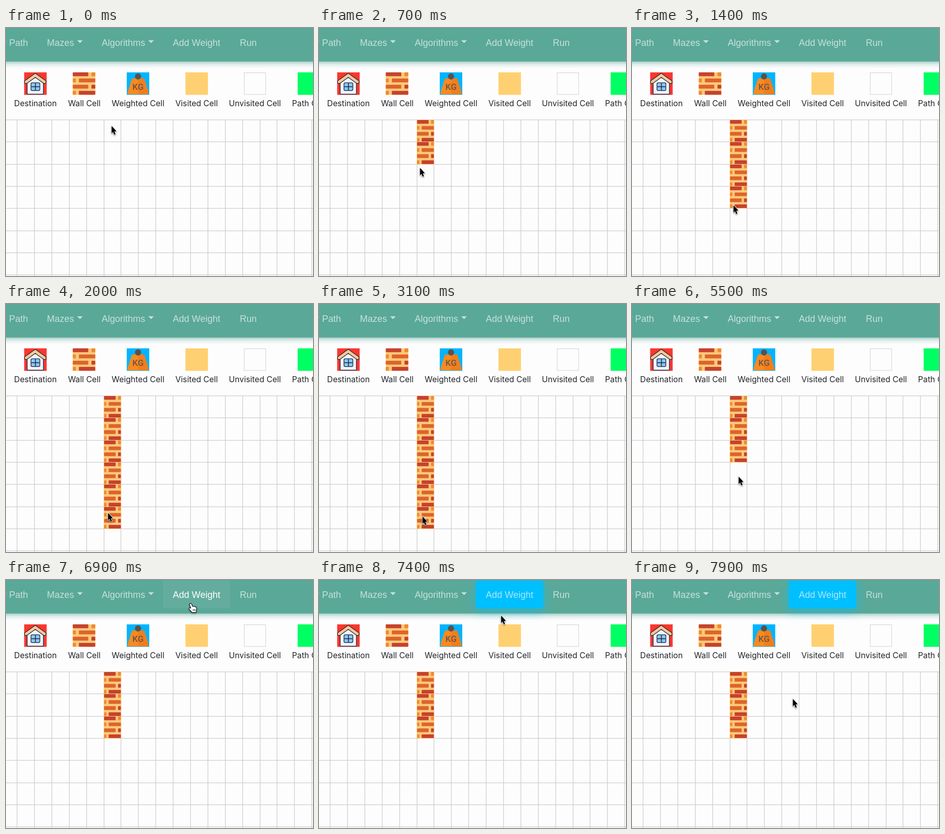
Write an HTML page with a canvas that moves like this. It is 600x485 px and loops after 8 s.

```html
<!DOCTYPE html>
<html lang="en">
<head>
<meta charset="utf-8">
<title>Grid walls</title>
<style>
html, body { margin: 0; width: 100%; height: 100%; overflow: hidden; background: #fefdfe; }
canvas { display: block; }
</style>
</head>
<body>
<canvas id="stage" width="600" height="485"></canvas>
<script>
const ctx = document.getElementById('stage').getContext('2d');
const LOOP = 8000, STEP = 100;
const NAV = '18px "Liberation Sans", Arial, sans-serif';
const LABEL = '15.7px Inter, sans-serif';
const TEAL = '#5aa898', DIM = 'rgba(255,255,255,.66)';
const WALL_COL = 5, ICON = 44, ICON_Y = 86.7;

const colX = i => Math.round(21.2 + 33.88 * i);
const rowY = i => Math.round(178.9 + 43.35 * i);

// [time, tip x, tip y]
const path = [
  [0, 206, 191], [200, 206, 192], [300, 204, 200], [700, 197, 273],
  [900, 197, 293], [1300, 198, 334], [1800, 198, 394], [2000, 199, 408],
  [2600, 200, 413], [3400, 203, 416], [4100, 204, 416], [4400, 205, 404],
  [4600, 206, 390], [5000, 207, 360], [5300, 208, 341], [5500, 208, 337],
  [6000, 212, 328], [6300, 232, 292], [6500, 285, 196], [6700, 345, 72],
  [6900, 361, 46], [7300, 361, 46], [7500, 350, 92], [7700, 328, 190],
  [7900, 314, 232]
];
const built = [300, 500, 800, 1200, 1500, 1900];
const erased = [3800, 4700, 5200];
const HOVER = [6700, 7400], CLICK = 7300;

function rect(color, x, y, w, h) {
  ctx.fillStyle = color;
  ctx.fillRect(x, y, w, h);
}

function text(str, x, y, font, color, align = 'left') {
  ctx.font = font;
  ctx.fillStyle = color;
  ctx.textAlign = align;
  ctx.fillText(str, x, y);
}

function shape(d, fill, stroke, width = 1.5) {
  const p = new Path2D(d);
  if (stroke) {
    ctx.strokeStyle = stroke;
    ctx.lineWidth = width;
    ctx.stroke(p);
  }
  if (fill) {
    ctx.fillStyle = fill;
    ctx.fill(p);
  }
}

function at(x, y, draw) {
  ctx.save();
  ctx.translate(x, y);
  draw();
  ctx.restore();
}

function brick(color, x, y, w, h) {
  ctx.fillStyle = color;
  ctx.beginPath();
  ctx.roundRect(x, y, w, h, 1.2);
  ctx.fill();
}

function bricks(x, y, w, h) {
  const red = '#c7422e', rust = '#de642b', amber = '#ef8b2c';
  rect('#fbc97b', x, y, w, h);
  [[red, amber], [amber, rust], [rust, red], [amber, red]].forEach(([a, b], i) => {
    const odd = i % 2, top = y + h * i * .275, tall = h * .17;
    brick(a, x, top, w * (odd ? .14 : .69), tall);
    const from = odd ? .27 : .83;
    brick(b, x + w * from, top, w * (1 - from), tall);
  });
}

function house() {
  const ink = '#17263f';
  rect('#fa372f', 0, 0, ICON, ICON);
  ctx.lineJoin = 'round';
  shape('M6.5 17L21.7 6L37 17V42H6.5Z', '#f0f3fa', ink, 2.6);
  shape('M1.5 17L21.7 2.5L42 17V21H38.5L21.7 9L5 21H1.5Z', '#fcc896', ink, 2.4);
  shape('M16 21H28Q30 21 30 23V33Q30 35 28 35H16Q14 35 14 33V23Q14 21 16 21Z', '#8cc7f4', ink, 2.6);
  shape('M22 21V35M14 28H30', null, ink, 1.5);
}

function weight() {
  rect('#00b4ff', 0, 0, ICON, ICON);
  shape('M10 12H34L43 41Q43 43 41 43H3Q1 43 1 41Z', '#f98a20');
  shape('M22 12H34L43 41Q43 43 41 43H22Z', '#f07e1c');
  ctx.beginPath();
  ctx.arc(22, 8, 6, 0, 7);
  ctx.fillStyle = '#5d5049';
  ctx.fill();
  text('KG', 22, 34, '500 17px Roboto, sans-serif', '#6b564a', 'center');
}

function legend() {
  at(35.5, ICON_Y, house);
  bricks(130.5, ICON_Y, ICON, ICON);
  at(236, ICON_Y, weight);
  rect('#ffd071', 350.7, ICON_Y, ICON, ICON);
  ctx.strokeStyle = '#d2d1d4';
  ctx.lineWidth = 1;
  ctx.strokeRect(465.5, 87.5, 42, 42.5);
  rect('#00ff62', 570, ICON_Y, ICON, ICON);
  const labels = [['Destination', 57.5], ['Wall Cell', 153], ['Weighted Cell', 258],
    ['Visited Cell', 372.5], ['Unvisited Cell', 486.5], ['Path Cell', 592]];
  for (const [name, x] of labels) text(name, x, 152.5, LABEL, '#212529', 'center');
}

function header(t) {
  const fade = ctx.createLinearGradient(0, 65, 0, 79);
  fade.addColorStop(0, 'rgba(90,168,152,.55)');
  fade.addColorStop(.45, 'rgba(90,168,152,.18)');
  fade.addColorStop(1, 'rgba(90,168,152,0)');
  rect(fade, 0, 65, 600, 14);
  rect(TEAL, 0, 0, 600, 65.5);

  const hover = t >= HOVER[0] && t < HOVER[1];
  if (t >= CLICK) {
    ctx.save();
    ctx.shadowColor = 'rgba(0,191,255,.6)';
    ctx.shadowBlur = 20;
    ctx.shadowOffsetY = 4;
    rect('#00bfff', 306.7, 1.3, 131.5, 54);
    ctx.restore();
  } else if (hover) {
    rect('rgba(255,255,255,.06)', 306.7, 1.3, 131.5, 54);
  }

  text('Clear Path', 43, 34.5, NAV, DIM, 'right');
  text('Mazes', 80, 34.5, NAV, DIM);
  text('Algorithms', 187, 34.5, NAV, DIM);
  text('Add Weight', 326, 34.5, NAV, hover ? '#fff' : DIM);
  text('Run', 457, 34.5, NAV, DIM);
  for (const x of [139, 278]) at(x, 24, () => shape('M0 0H11L5.5 5.5Z', DIM));
}

function grid(t) {
  const line = '#cbcacd';
  for (let i = 0; i < 18; i++) rect(line, colX(i), 179, 1.2, 306);
  for (let i = 0; i < 8; i++) rect(line, 0, rowY(i), 600, 1.2);
  const passed = times => times.filter(s => t >= s).length;
  const count = passed(built) - passed(erased);
  const x = colX(WALL_COL), w = colX(WALL_COL + 1) - x;
  for (let i = 0; i < count; i++) {
    const y = rowY(i), h = rowY(i + 1) - y;
    rect('#fbc97b', x, y + .5, w + .7, h + .5);
    bricks(x + .7, y + 1, w - .2, h - .7);
  }
}

function pointer(t) {
  const i = Math.max(1, path.findIndex(p => p[0] >= t));
  const [t0, x0, y0] = path[i - 1], [t1, x1, y1] = path[i];
  const k = (t - t0) / (t1 - t0);
  at(x0 + (x1 - x0) * k, y0 + (y1 - y0) * k, () => {
    ctx.lineJoin = 'round';
    ctx.shadowColor = 'rgba(0,0,0,.3)';
    ctx.shadowBlur = 3;
    ctx.shadowOffsetY = 1.5;
    if (t >= HOVER[0] && t < HOVER[1]) {
      shape('M-2 1Q-1-1 1 1L4 7Q5 5 6.5 6.5Q8.5 5.5 9.5 7.5Q11.5 7.5 11 11L10 17H3L-2.5 11Q-3.5 8-1 9L1 10.5Z',
        '#fff', '#000', 1.9);
      ctx.shadowColor = 'transparent';
      shape('M4.7 11V14.5M6.7 11V14.5M8.7 11V14.5', null, '#000', .8);
    } else {
      ctx.scale(.93, .93);
      shape('M.5 .5V16L3.6 13L6.2 19L8.6 18L6.2 12L10.5 11.5Z', '#000', '#fff', 2);
    }
  });
}

function frame(now) {
  const t = Math.floor(now % LOOP / STEP) * STEP;
  rect('#fefdfe', 0, 0, 600, 485);
  grid(t);
  legend();
  header(t);
  pointer(t);
  requestAnimationFrame(frame);
}
requestAnimationFrame(frame);
</script>
</body>
</html>
```
